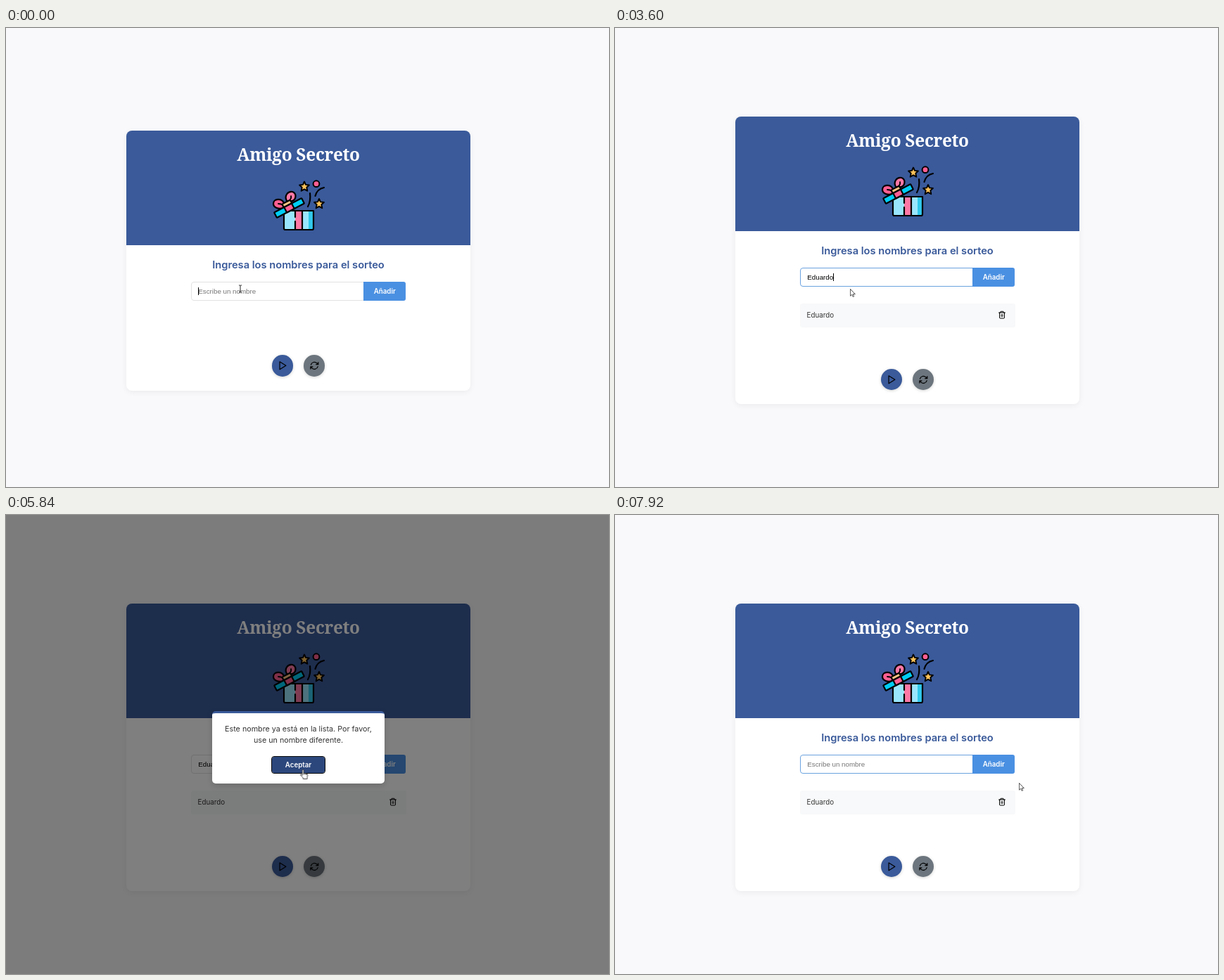
Write an HTML page that moves like this. It is 857 by 653 pixels and loops after 8 s.

```html
<!DOCTYPE html>
<html lang="es">
<head>
<meta charset="utf-8">
<title>Amigo Secreto</title>
<style>
  :root { --navy: #3a5a9a; --sky: #4a90e2; --loop: 8s infinite; }
  * { box-sizing: border-box; }
  html, body { margin: 0; width: 100%; height: 100%; overflow: hidden; }
  body { position: relative; background: #f9f9fb; color: #333; font: 9.76px Inter, sans-serif; }
  svg { display: block; overflow: visible; }
  .card, .card > *, .overlay, .modal, .cursor, .cursor svg, .placeholder { position: absolute; }

  .card {
    left: 171px; width: 489px;
    background: #fff; border-radius: 8px; box-shadow: 0 2px 9px rgba(0, 0, 0, .06);
    animation: grow var(--loop) step-end;
  }
  .header { width: 100%; height: 162.7px; background: var(--navy); border-radius: 8px 8px 0 0; }
  h1, h2 { left: 0; width: 100%; margin: 0; text-align: center; }
  h1 { top: 14px; color: #fff; font: bold 24.4px/40px "Noto Serif", serif; letter-spacing: -.013em; }
  h2 { top: 181px; color: var(--navy); font-weight: 600; font-size: 14.67px; line-height: 20px; }
  .gift { left: 208px; top: 70px; }

  .field {
    left: 92px; top: 214.7px; width: 246px; height: 27px; padding-left: 9.3px;
    display: flex; align-items: center; border: 1px solid #e2e2e2; border-radius: 4px 0 0 4px;
    color: #000; font-family: "Liberation Sans", Arial, sans-serif; white-space: pre;
    animation: focus var(--loop);
  }
  .placeholder { color: #757575; }
  .caret { width: 1px; height: 11px; background: #000; }
  .add {
    left: 337.3px; top: 214.7px; width: 60px; height: 27px; line-height: 27px; text-align: center;
    color: #fff; background: var(--sky); border-radius: 0 3px 3px 0; font-weight: 600;
  }
  .item {
    left: 92px; top: 266px; width: 305.5px; height: 34px; padding-left: 9.6px; line-height: 34px;
    background: #f8f9fa; border-radius: 3px; animation: item var(--loop);
  }
  .item svg { position: absolute; left: 281px; top: 10px; animation: trash var(--loop) step-end; }
  .round {
    bottom: 19.7px; width: 30.6px; height: 30.6px; padding: 8px; border-radius: 50%;
    box-shadow: 0 1px 4px rgba(0, 0, 0, .18);
  }
  .play { left: 206.6px; background: var(--navy); }
  .reset { left: 251.8px; background: #6c757d; }
  .icon { fill: none; stroke: #000; stroke-width: 2; stroke-linecap: round; stroke-linejoin: round; }

  .overlay { inset: 0; background: rgba(0, 0, 0, .5); animation: overlay var(--loop) step-end; }
  .modal {
    left: 293px; top: 279px; width: 245px; height: 102.6px; padding-top: 14.5px; text-align: center;
    background: #fff; border-top: 3px solid var(--navy); border-radius: 5px;
    box-shadow: 0 3px 9px rgba(0, 0, 0, .15);
    font-size: 10.74px; line-height: 16.1px; animation: modal var(--loop);
  }
  .accept {
    width: 74.4px; height: 23.4px; margin: 15px auto 0; line-height: 23.4px; border-radius: 3px;
    color: #fff; background: var(--navy); outline: 1.5px solid #0a0a0a;
    font-size: 9.76px; font-weight: 600; animation: hover var(--loop) step-end;
  }

  .cursor { left: 0; top: 0; animation: travel var(--loop); }
  .beam { animation: beam var(--loop) step-end; }
  .arrow { animation: arrow var(--loop) step-end; }
  .hand { animation: hand var(--loop) step-end; }

  @keyframes grow {
    0% { top: 146px; height: 369.6px }
    17.5%, 100% { top: 126px; height: 409px }
  }
  @keyframes focus {
    0%, 48%, 78.7% { border-color: #e2e2e2 }
    3%, 45.5%, 81%, 100% { border-color: #6ba3e0 }
  }
  @keyframes item {
    0%, 17.5% { opacity: 0; animation-timing-function: ease }
    21%, 100% { opacity: 1 }
  }
  @keyframes trash { 0% { visibility: hidden } 23.5%, 100% { visibility: visible } }
  @keyframes overlay {
    0%, 73.5% { visibility: hidden }
    45.5% { visibility: visible }
    100% { visibility: hidden }
  }
  @keyframes modal {
    0%, 45.65% { opacity: 0; transform: translateY(-13px); animation-timing-function: ease }
    49.4%, 100% { opacity: 1; transform: none }
  }
  @keyframes hover { 0% { background: var(--navy) } 66.5%, 100% { background: #2c477c } }
  @keyframes travel {
    0%, 21% { transform: translate(333px, 371px) }
    23%, 61.5% { transform: translate(334px, 371px); animation-timing-function: ease-in-out }
    71.5%, 93.5% { transform: translate(422.5px, 362px); animation-timing-function: ease-in-out }
    99%, 100% { transform: translate(574px, 381px) }
  }
  @keyframes beam {
    0%, 73.5% { visibility: visible }
    17.5%, 95.5%, 100% { visibility: hidden }
  }
  @keyframes arrow {
    0%, 66.5% { visibility: hidden }
    17.5%, 95.5%, 100% { visibility: visible }
  }
  @keyframes hand {
    0%, 73.5%, 100% { visibility: hidden }
    66.5% { visibility: visible }
  }
</style>
</head>
<body>
<main class="card">
  <div class="header"></div>
  <h1>Amigo Secreto</h1>
  <svg class="gift" width="74" height="74" fill="none" stroke="#000" stroke-width="2.2" stroke-linecap="round" stroke-linejoin="round">
    <defs>
      <path id="star" d="M0-7l2 4.400 4.900.6-3.600 3.300 1 4.900L0 3.800l-4.300 2.400 1-4.900-3.600-3.300 4.900-.6z" fill="#ffc35a" stroke-width="1.9"/>
    </defs>
    <path d="M16 44h42v25q0 2-2 2H18q-2 0-2-2z" fill="#99e6fc" stroke="none"/>
    <path d="M51 44h7v27h-7z" fill="#32c8ec" stroke="none"/>
    <path d="M32 44h10v27H32z" fill="#ff78a5" stroke="none"/>
    <path d="M16 44h42v25q0 2-2 2H18q-2 0-2-2zM32 44v9M32 59v12M42 44v27"/>
    <path d="M15 40C9 42 1 40 1 34c0-8 12-8 15-1z" fill="#ff5f92"/>
    <path d="M20 30c-4-8 2-14 8-13 6 2 6 10 0 13z" fill="#ff78a5"/>
    <path d="M8 34q4 0 7 2M26 23q1 3-2 6" stroke-width="1.8"/>
    <g transform="translate(23.5 40) rotate(-27.5)">
      <rect x="-6.5" y="-9.5" width="13" height="6" rx="1.5" fill="#ffc384"/>
      <rect x="-22" y="-4.2" width="44" height="8.4" rx="1" fill="#00cdf4"/>
      <path d="M-6-4.200H6v8.400H-6z" fill="#ff5f92"/>
    </g>
    <use href="#star" x="45" y="9.5"/>
    <use href="#star" x="66" y="34"/>
    <circle cx="62" cy="5.7" r="4.4" fill="#ff5f92" stroke-width="2"/>
    <path d="M53 19q1.500 11-3 19M73 11q-10 2-12.500 12"/>
  </svg>
  <h2>Ingresa los nombres para el sorteo</h2>
  <div class="field">
    <span class="placeholder">Escribe un nombre</span><span class="typed"></span><span class="caret"></span>
  </div>
  <div class="add">Añadir</div>
  <div class="item">Eduardo
    <svg class="icon" width="12" height="12" viewBox="0 0 24 24">
      <path d="M3 6h18M8 6V2.500h8V6M5 6v14q0 2 2 2h10q2 0 2-2V6M10 11v6M14 11v6"/>
    </svg>
  </div>
  <div class="round play">
    <svg class="icon" width="14.6" height="14.6" viewBox="0 0 24 24"><path d="M5 3l14.500 9L5 21z"/></svg>
  </div>
  <div class="round reset">
    <svg class="icon" width="14.6" height="14.6" viewBox="0 0 24 24">
      <path id="arc" d="M4 9.900a8.250 8.250 0 0 1 13.800-3.700L21 9.400M21 4.400v5h-5"/>
      <use href="#arc" transform="rotate(180 12 12)"/>
    </svg>
  </div>
</main>

<div class="overlay">
  <div class="modal">
    Este nombre ya está en la lista. Por favor,<br>use un nombre diferente.
    <div class="accept">Aceptar</div>
  </div>
</div>

<div class="cursor">
  <svg class="beam" width="1" height="1" fill="none" stroke="#222" stroke-width="1">
    <path d="M-2-5h1.500L0-4.500.5-5H2M0-4.500v9M-2 5h1.500L0 4.500.5 5H2"/>
  </svg>
  <svg class="arrow" width="1" height="1" fill="#fff" stroke="#222" stroke-width=".8" stroke-linejoin="round">
    <path d="M.4.400v9.800l2.300-2 1.500 3.200 1.500-.7-1.400-3.100h3z"/>
  </svg>
  <svg class="hand" width="1" height="1" fill="#fff" stroke="#222" stroke-width=".8" stroke-linejoin="round">
    <path d="M-1.300 8.500V1.200q0-1 1-1t1 1v4l4 .8q1.600.3 1.500 2L5.600 11v2.500H-.2V12l-3.800-4q-.4-1 .6-1.200z"/>
    <path d="M.7 5v2.500M2.700 5.500v2M4.600 6v2" fill="none"/>
  </svg>
</div>

<script>
  const NAME = "Eduardo", LOOP = 8000, KEY = 80, BLINK = 530;
  const ENTER = 1400, DIALOG = 3640, REFOCUS = 6300;
  const [typed, caret, placeholder] = [".typed", ".caret", ".placeholder"].map(s => document.querySelector(s));

  // Number of keys pressed by time t when typing starts at `start`.
  const keys = (t, start) => Math.max(0, Math.min(NAME.length, Math.floor((t - start) / KEY) + 1));

  function letters(t) {
    if (t < ENTER) return keys(t, 720);
    return keys(t, 2800) - keys(t, 6720);
  }

  function lastInput(t) {
    const held = [6720, 2800, 720].find(start => t >= start);
    const lastKey = held ? held + (keys(t, held) - 1) * KEY : 0;
    const events = [ENTER, REFOCUS].filter(e => e <= t);
    return Math.max(lastKey, ...events);
  }

  function draw(now) {
    const t = now % LOOP;
    const text = NAME.slice(0, letters(t));
    const focused = t < DIALOG || t >= REFOCUS;
    const lit = (t - lastInput(t)) % (2 * BLINK) < BLINK;
    typed.textContent = text;
    placeholder.style.visibility = text ? "hidden" : "visible";
    caret.style.visibility = focused && lit ? "visible" : "hidden";
  }

  const start = performance.now();
  function tick() {
    draw(performance.now() - start);
    requestAnimationFrame(tick);
  }
  tick();
</script>
</body>
</html>
```
